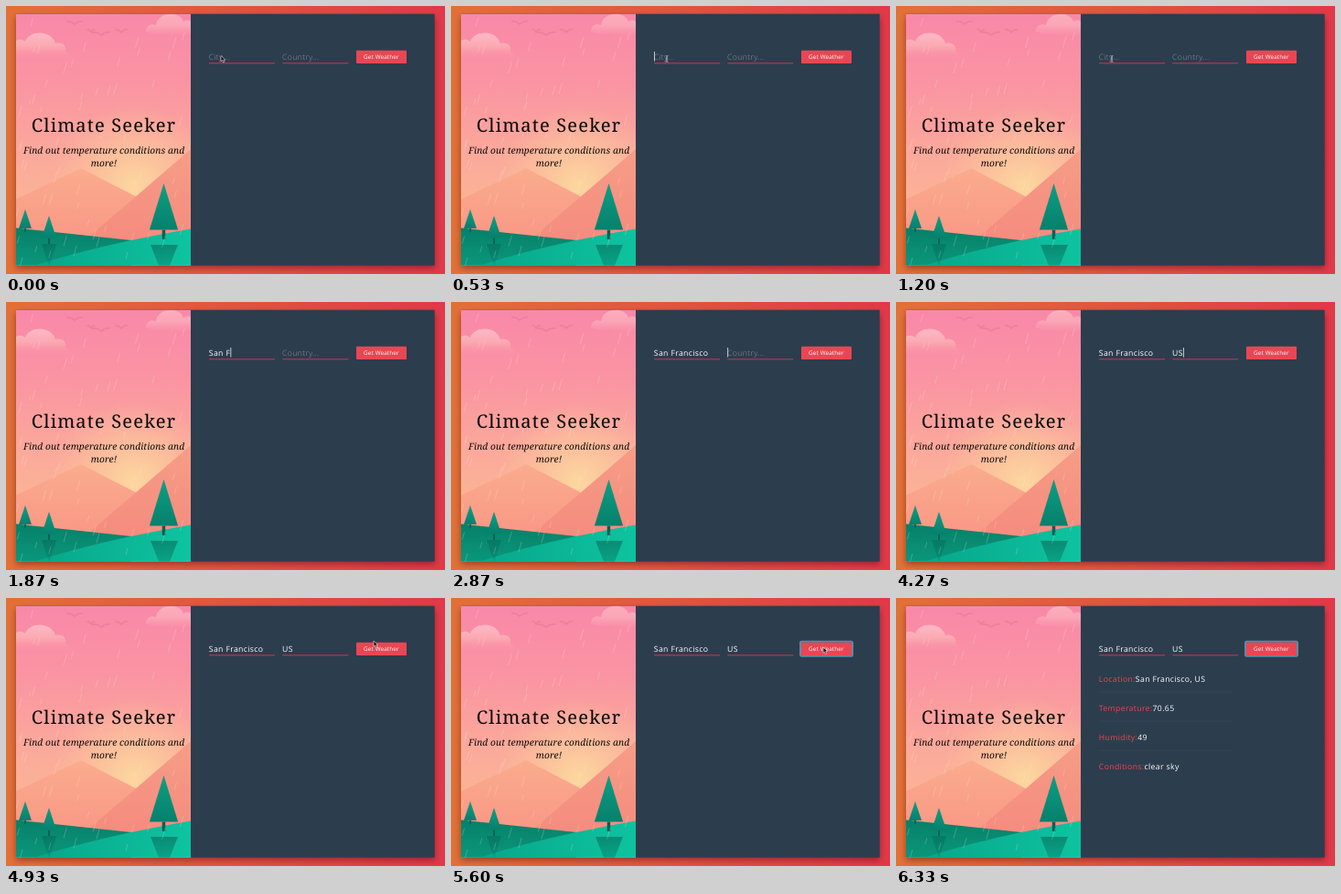
An HTML page with a canvas that plays this animation: 480x294 px, repeating every 6.39 s.

```html
<!DOCTYPE html>
<html lang="en">
<head>
<meta charset="utf-8">
<title>Climate Seeker</title>
<style>
html, body { margin: 0; width: 100%; height: 100%; overflow: hidden; background: #e2503f; }
canvas, svg { position: absolute; left: 0; top: 0; width: 480px; height: 294px; }
text { white-space: pre; text-rendering: geometricPrecision; font: 8.7px "Open Sans", sans-serif; letter-spacing: .35px; fill: #fff; }
.title { font: 500 20.2px "Noto Serif", serif; letter-spacing: 1.1px; fill: #050505; text-anchor: middle; }
.sub { font: italic 10.2px "Noto Serif", serif; letter-spacing: .08px; fill: #100808; text-anchor: middle; }
.hint { font-weight: 300; fill: #8b9198; }
.label { fill: #ea4650; font-weight: 500; }
.btn { font-size: 6.3px; font-weight: 500; letter-spacing: .15px; }
</style>
</head>
<body>
<canvas id="scene"></canvas>
<svg viewBox="0 0 480 294">
  <text class="title" x="107" y="138">Climate Seeker</text>
  <text class="sub" x="107" y="162">Find out temperature conditions and</text>
  <text class="sub" x="107" y="176">more!</text>

  <text class="hint" id="cityHint" x="221.8" y="58.5">City...</text>
  <text id="city" x="221.8" y="58.5"></text>
  <text class="hint" id="countryHint" x="302" y="58.5">Country...</text>
  <text id="country" x="302" y="58.5"></text>
  <path d="M222 62.8h72M302.3 62.8h72" stroke="#c53d4b"/>

  <rect id="ring" x="382" y="47.8" width="57" height="16" rx="1.5" fill="none" stroke="#5c8ba8" stroke-width="2"/>
  <rect x="383" y="48.7" width="55" height="14.3" rx="1" fill="#e94653"/>
  <text class="btn" x="391.1" y="58.2">Get Weather</text>

  <g id="results">
    <path d="M222 103h145M222 135.2h145M222 167.3h145" stroke="#36475a" stroke-width=".8"/>
    <text x="221.8" y="91.5"><tspan class="label">Location:</tspan>San Francisco, US</text>
    <text x="221.8" y="123.5"><tspan class="label">Temperature:</tspan>70.65</text>
    <text x="221.8" y="155.7"><tspan class="label">Humidity:</tspan>49</text>
    <text x="221.8" y="187.7"><tspan class="label">Conditions:</tspan>clear sky</text>
  </g>

  <rect id="caret" y="50" width=".8" height="10.5" fill="#e8eaec"/>
  <path id="beam" d="M234.5 54.5q1.5 0 1.5 1v5q0 1-1.5 1M237.5 54.5q-1.5 0-1.5 1v5q0 1 1.5 1" fill="none" stroke="#b9bec3" stroke-width=".7"/>
  <path id="arrow" d="M0 0v6.3l1.5-1.3 1.1 2.5 1.2-.5-1.1-2.5h2z" fill="#111" stroke="#e8e8e8" stroke-width=".6"/>
</svg>
<script>
const LOOP = 6390, CITY = "San Francisco", COUNTRY = "US";
const $ = id => document.getElementById(id);

function drawScene() {
  const canvas = $("scene"), dpr = window.devicePixelRatio || 1;
  canvas.width = 480 * dpr;
  canvas.height = 294 * dpr;
  const c = canvas.getContext("2d");
  c.scale(dpr, dpr);

  const blend = (x0, y0, x1, y1, ...colors) => {
    const g = c.createLinearGradient(x0, y0, x1, y1);
    colors.forEach((color, i) => g.addColorStop(i / (colors.length - 1), color));
    return g;
  };
  const poly = (fill, ...p) => {
    c.beginPath();
    for (let i = 0; i < p.length; i += 2) c.lineTo(p[i], p[i + 1]);
    c.fillStyle = fill;
    c.fill();
  };
  const shape = (fill, path) => {
    c.fillStyle = fill;
    c.fill(new Path2D(path));
  };

  c.fillStyle = blend(0, 147, 480, 147, "#e27036", "#e25440", "#e23848");
  c.fillRect(0, 0, 480, 294);
  c.save();
  c.shadowColor = "rgba(50,10,15,.45)";
  c.shadowBlur = 7 * dpr;
  c.shadowOffsetY = 3 * dpr;
  c.fillStyle = "#2c3d4e";
  c.fillRect(11, 8.7, 457.7, 276);
  c.restore();

  c.save();
  c.beginPath();
  c.rect(11, 8.7, 191, 276);
  c.clip();

  c.fillStyle = blend(0, 9, 0, 240, "#f988a9", "#fa94a2", "#fba99b", "#fbb794");
  c.fillRect(11, 8, 191, 278);
  const glow = c.createRadialGradient(140, 198, 5, 140, 198, 90);
  glow.addColorStop(0, "rgba(252,219,160,.85)");
  glow.addColorStop(1, "rgba(252,208,155,0)");
  c.fillStyle = glow;
  c.fillRect(11, 9, 191, 276);

  // Clouds
  shape(blend(0, 30, 0, 58, "#fcb9c4", "#fba9b2", "rgba(250,150,165,0)"),
    "M11 38q5-3 10 1c4-13 29-13 33 2 8-2 13 4 11 9 5 1 6 4 6 8H11z");
  shape(blend(0, 9, 0, 34, "#fbadbf", "#fba6b6", "rgba(250,150,165,.1)"),
    "M153 28c0-7 6-9 11-7 1-14 25-17 30-4q5-3 8 0v14q-9 4-18 0-6 3-12-1-10 3-19-2z");

  // Birds
  c.strokeStyle = "#ee7f9b";
  c.lineWidth = 1.4;
  for (const [x, y, s] of [[75, 19, 1], [104, 31, 1.15], [126, 28, .8], [93, 28, .5]]) {
    c.beginPath();
    c.moveTo(x - 9 * s, y - 2);
    c.quadraticCurveTo(x - 4 * s, y - 3, x, y + 1);
    c.quadraticCurveTo(x + 4 * s, y - 3, x + 9 * s, y - 2);
    c.stroke();
  }

  // Mountains
  poly(blend(0, 178, 0, 255, "#faac8e", "#f99885"), 11, 212, 82, 178, 142, 209, 160, 265, 11, 265);
  poly(blend(0, 157, 0, 255, "#f69d87", "#f58c7f"), 202, 157, 142, 209, 85, 258, 202, 265);

  // Hills meet in a valley; the front one slopes down to the lower left.
  shape(blend(0, 244, 0, 285, "#078069", "#0a977b"), "M11 243.5L137 257V285H11z");
  shape(blend(30, 0, 202, 0, "#08a68a", "#0bb495", "#0ec3a0"),
    "M202 244.5Q170 250 137 257 80 269 30 285H202z");

  const tree = (x, top, half, base, trunk) => {
    poly("#075e55", x - half / 9, base, x + half / 9, base, x + half / 9, trunk, x - half / 9, trunk);
    poly(blend(0, top, 0, base, "#0e9f84", "#06806c"), x, top, x + half, base, x - half, base);
  };
  const reflection = (x, half, top, tip) =>
    poly(blend(0, top, 0, tip, "rgba(4,112,94,.65)", "rgba(4,112,94,.15)"), x - half, top, x + half, top, x, tip);

  reflection(173, 15, 262, 300);
  reflection(47, 8, 261, 286);
  tree(172.5, 194.5, 15.6, 245.5, 256);
  tree(21, 223, 7, 244, 248);
  tree(47, 230, 8, 254.5, 261);

  // Rain
  let seed = 29;
  const rnd = () => (seed = seed * 16807 % 2147483647) / 2147483647;
  c.strokeStyle = "rgba(255,235,230,.32)";
  c.lineWidth = .7;
  for (let i = 0; i < 62; i++) {
    const x = 11 + rnd() * 191, y = 12 + rnd() * 268, len = 6 + rnd() * 7;
    c.beginPath();
    c.moveTo(x, y);
    c.lineTo(x - len * .28, y + len);
    c.stroke();
  }
  c.restore();
}

const show = (el, on) => el.setAttribute("visibility", on ? "visible" : "hidden");
const ease = p => { p = Math.min(1, Math.max(0, p)); return p * p * (3 - 2 * p); };
const typed = (word, t, start, step) =>
  word.slice(0, Math.max(0, Math.floor((t - start) / step) + 1));

function setField(id, value) {
  const el = $(id);
  if (el.textContent !== value) el.textContent = value;
  show($(id + "Hint"), !value);
  return value ? el.getComputedTextLength() : 0;
}

function update(t) {
  const cityWidth = setField("city", typed(CITY, t, 1440, 100));
  const countryWidth = setField("country", typed(COUNTRY, t, 3960, 140));

  // The caret stays solid while typing and blinks from the last input.
  const since = t >= 4100 ? 4100 : t >= 3960 ? 3960 : t >= 2730 ? 2730 : t >= 1440 ? Math.min(t, 2640) : 470;
  show($("caret"), t >= 470 && t < 5400 && (t - since) % 1000 < 500);
  $("caret").setAttribute("x", t < 2730 ? 222 + cityWidth : 302.3 + countryWidth);

  const go = ease((t - 4540) / 360), press = ease((t - 4960) / 300);
  const x = t < 4500 ? 235 : 235 + 167 * go + 5 * press;
  const y = t < 4500 ? 54.5 : 54.5 - 7.5 * go + 7 * press;
  $("arrow").setAttribute("transform", `translate(${x} ${y})`);
  show($("arrow"), t < 400 || t >= 4500 && t < 5740);
  show($("beam"), t >= 400 && t < 1440);
  show($("ring"), t >= 5400);
  show($("results"), t >= 5740);
}

drawScene();
const begin = performance.now();
function tick() {
  update((performance.now() - begin) % LOOP);
  requestAnimationFrame(tick);
}
tick();
</script>
</body>
</html>
```
